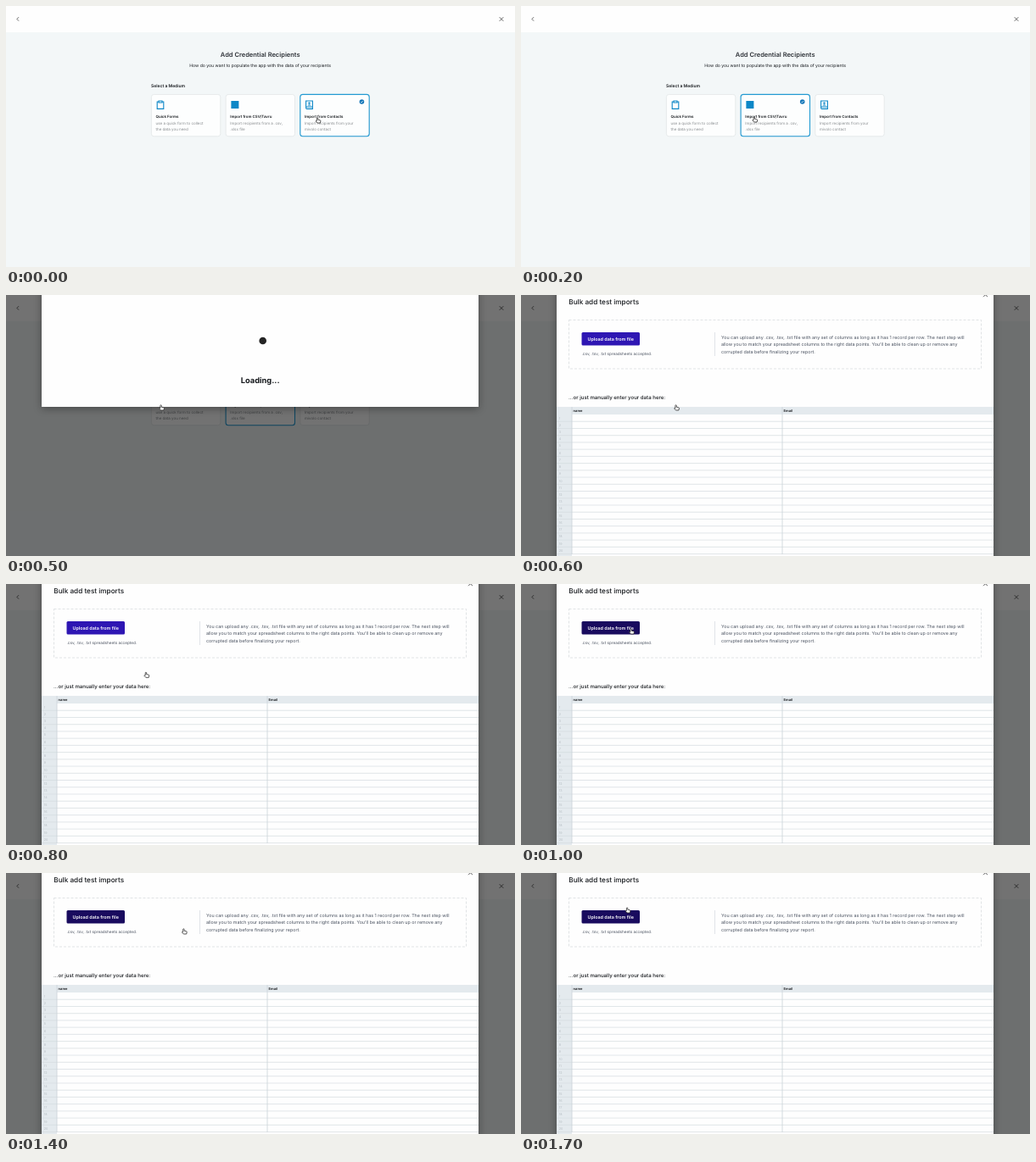
An HTML page for the animation above (1.8 s loop, 600x308 px).

```html
<!DOCTYPE html>
<html lang="en">
<head>
<meta charset="utf-8">
<title>Add recipients</title>
<style>
  html, body { margin: 0; height: 100%; overflow: hidden; background: #f3f7f8; }
  svg { display: block; width: 100vw; height: 100vh; }
  text { font-family: Inter, sans-serif; text-rendering: geometricPrecision; fill: #16191d; }
  .mid { text-anchor: middle; }
  .bold { font-weight: 600; }
  .medium { font-weight: 500; }
  .line { fill: none; stroke: #555; stroke-width: .9; }
  .card { fill: #fdfefe; stroke: #e2e6e8; stroke-width: .8; }
  .label { font-size: 4.43px; font-weight: 600; }
  .note { font-size: 4.48px; fill: #85898c; }
  .icon { fill: none; stroke: #0d87c7; stroke-width: 1.1; }
  .copy { font-size: 5.35px; fill: #4a5260; }
  .head { font-size: 4.05px; font-weight: 600; }
  .num { font-size: 3.7px; fill: #b4bbc1; }
  .panel { fill: #fefefe; filter: drop-shadow(0 2px 5px rgba(0, 0, 0, .35)); }
</style>
</head>
<body>
<svg viewBox="0 0 600 308">
  <rect width="600" height="308" fill="#f3f7f8"/>
  <rect width="600" height="31" fill="#fefefe"/>
  <path class="line" d="M15 13.2 12.9 15.4 15 17.6M581.7 13.2l4.6 4.6m0-4.6-4.6 4.6"/>
  <text class="mid bold" x="299.7" y="60.3" font-size="7.5" style="fill:#30343a">Add Credential Recipients</text>
  <text class="mid" x="299.6" y="72.2" font-size="5.12">How do you want to populate the app with the data of your recipients</text>
  <text class="bold" x="171" y="96.4" font-size="5">Select a Medium</text>
  <g id="cards"></g>
  <g id="selection">
    <rect x=".4" y="104.4" width="81.4" height="49.4" rx="3" fill="none" stroke="#249bd3" stroke-width="1.1"/>
    <circle cx="73" cy="113" r="2.8" fill="#1476b8"/>
    <path d="m71.7 113 1 1 1.7-1.9" fill="none" stroke="#fff" stroke-width=".7"/>
  </g>

  <rect id="shade" width="600" height="308" fill-opacity=".55"/>

  <g id="loading">
    <rect class="panel" x="42" y="-20" width="515" height="152"/>
    <circle cx="302.7" cy="54" r="4.3" fill="#242424"/>
    <text class="mid" x="299.6" y="103.5" font-size="9.3" font-weight="700">Loading...</text>
  </g>

  <g id="importer">
    <rect class="panel" x="42" y="-20" width="515" height="348"/>
    <path class="line" d="m545 2.2 5-5m-5 0 5 5"/>
    <text class="medium" x="56.3" y="11.4" font-size="8.2">Bulk add test imports</text>
    <rect x="56.5" y="29.5" width="486" height="57.5" fill="none" stroke="#d9dcdf" stroke-width=".8" stroke-dasharray="3 2"/>
    <rect id="button" x="71.5" y="44" width="68.5" height="15.5" rx="1.5"/>
    <text class="mid bold" x="105.7" y="53.8" font-size="5.4" style="fill:#fff">Upload data from file</text>
    <text x="71.5" y="70.7" font-size="4.64" style="fill:#4a5260">.csv, .tsv, .txt spreadsheets accepted.</text>
    <path d="M228.5 44v28" stroke="#d9dde2" stroke-width=".8"/>
    <text class="copy" x="236" y="51.5">You can upload any .csv, .tsv, .txt file with any set of columns as long as it has 1 record per row. The next step will</text>
    <text class="copy" x="236" y="60.1">allow you to match your spreadsheet columns to the right data points. You'll be able to clean up or remove any</text>
    <text class="copy" x="236" y="68.7">corrupted data before finalizing your report.</text>
    <text class="medium" x="56" y="122.8" font-size="6.1">...or just manually enter your data here:</text>
    <path d="M42 132h515v9H60v167H42z" fill="#e4eaee"/>
    <g id="rows"></g>
    <path d="M60 132v174M308 132v174" stroke="#cbd3d9" stroke-width=".8"/>
    <text class="head" x="61.6" y="138.2">name</text>
    <text class="head" x="309.6" y="138.2">Email</text>
  </g>

  <path id="cursor" fill="#fff" stroke="#222" stroke-width=".75" stroke-linejoin="round"
    d="M-1.6.5V-2.7q.7-1 1.4 0v1.9l2.3.5q.9.2.8 1.1L2.4 3H-1L-2.9.9q.2-.9 1.3-.4z"/>
</svg>
<script>
const $ = id => document.getElementById(id);
const cardX = [171, 258.7, 346.4];
const cards = [
  ["Quick Forms", "use a quick form to collect", "the data you need",
    '<path class="icon" d="M9 113H7.2v8.4h7.6V113H13M9 112h4v2H9z"/>'],
  ["Import from CSV/Tavru", "Import recipients from a .csv,", ".xlsx file",
    '<rect x="6.7" y="112" width="9" height="9" fill="#0d87c7"/>'],
  ["Import from Contacts", "Import recipients from your", "mivolo contact",
    `<path class="icon" d="M15 119H8.2q-1 0-1 1.2t1 1.2H15V112H7.2v8"/>
     <path d="M9 117.6q2.1-2.6 4.2 0z" fill="#0d87c7"/><circle cx="11.1" cy="114.6" r="1.2" fill="#0d87c7"/>`]
];
$("cards").innerHTML = cards.map(([label, first, second, icon], i) => `
  <g transform="translate(${cardX[i]})">
    <rect class="card" x=".4" y="104.4" width="81.4" height="49.4" rx="3"/>${icon}
    <text class="label" x="5.6" y="132">${label}</text>
    <text class="note" x="5.6" y="140.1">${first}</text>
    <text class="note" x="5.6" y="146.8">${second}</text>
  </g>`).join("");

const rowHeight = 8.23;
$("rows").innerHTML = Array.from({ length: 20 }, (_, i) => {
  const y = 141 + i * rowHeight;
  return `<path d="M42 ${y + rowHeight}H557" stroke="#d5dbe0" stroke-width=".7"/>
    <text class="num" x="44.7" y="${y + 5.5}">${i + 1}</text>`;
}).join("");

// Cursor path: [step, x, y], one step per 100 ms
const path = [[0, 368, 135], [4, 183.5, 133], [7, 183.5, 133], [10, 130.5, 56],
  [11, 130.5, 56], [13, 209, 68], [14, 210.3, 69], [17, 126, 44]];

function cursorAt(step) {
  const i = Math.max(1, path.findIndex(p => p[0] >= step));
  const [s0, x0, y0] = path[i - 1], [s1, x1, y1] = path[i];
  const k = (step - s0) / (s1 - s0);
  return [x0 + (x1 - x0) * k, y0 + (y1 - y0) * k];
}

const show = (id, on) => $(id).setAttribute("display", on ? "inline" : "none");

function draw(now) {
  const step = Math.floor(now % 1800 / 100);
  $("selection").setAttribute("transform", `translate(${cardX[step < 2 ? 2 : 1]})`);
  show("shade", step >= 5);
  show("loading", step === 5);
  show("importer", step >= 6);
  $("button").setAttribute("fill", step < 10 ? "#2e16b3" : "#190b5e");
  $("cursor").setAttribute("transform", `translate(${cursorAt(step)})`);
}

const start = performance.now();
function tick() {
  draw(performance.now() - start);
  requestAnimationFrame(tick);
}
tick();
</script>
</body>
</html>
```
